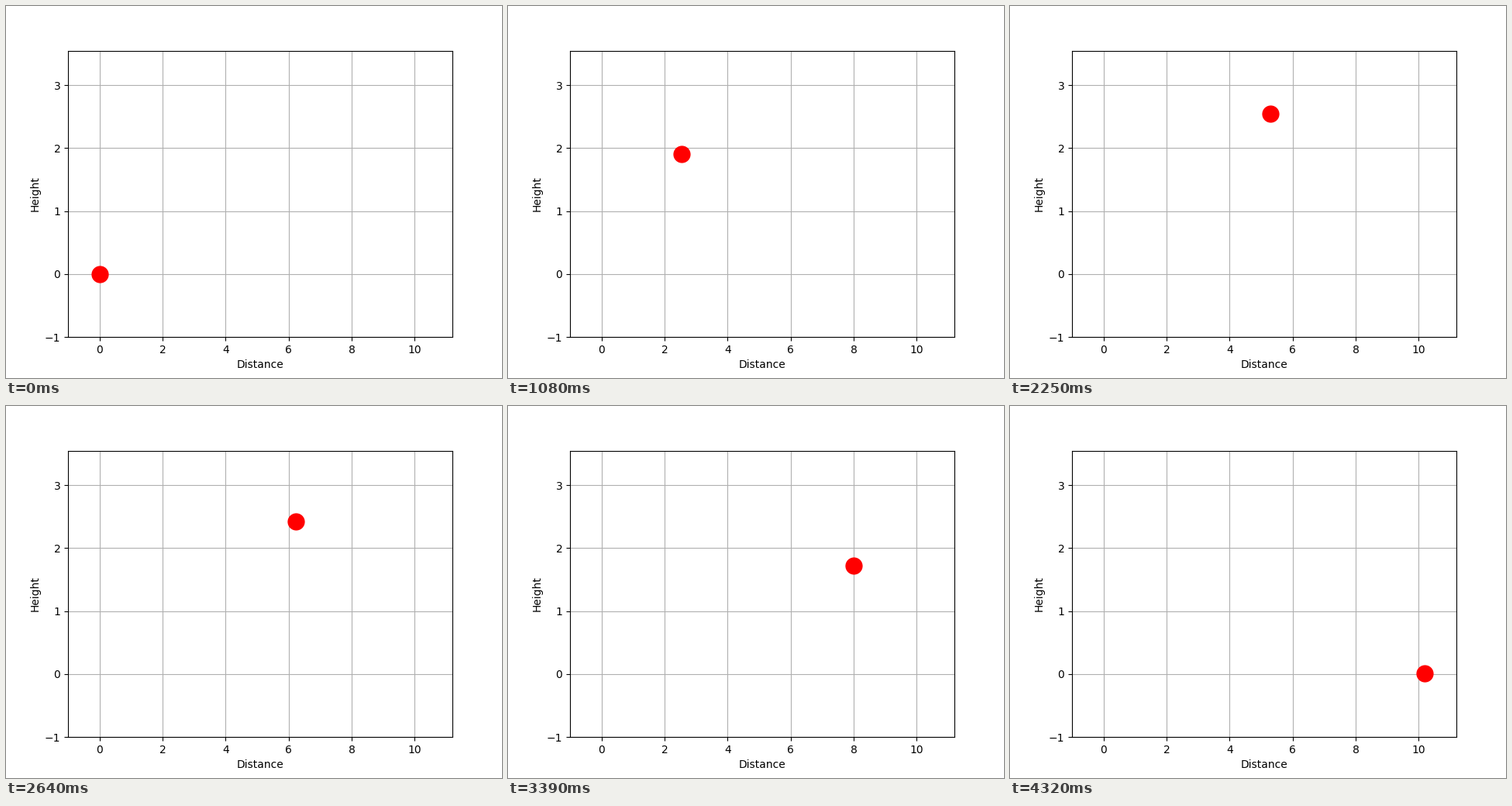
Recreate the animation shown at these times as a matplotlib script. Size 640 by 480 pixels, loop 4.35 s.

```python
import numpy as np
import matplotlib.pyplot as plt
from matplotlib.animation import FuncAnimation

G = 9.81
SPEED = 10.0
ANGLE = np.radians(45)
DT = 0.01

vx, vy = SPEED * np.cos(ANGLE), SPEED * np.sin(ANGLE)
flight = 2 * vy / G
frames = int(flight / DT) + 1

fig, ax = plt.subplots(figsize=(6.4, 4.8), dpi=100)
ax.set_xlim(-1, vx * flight + 1)
ax.set_ylim(-1, vy**2 / (2 * G) + 1)
ax.set_xticks(range(0, 11, 2))
ax.set_yticks(range(-1, 4))
ax.set_xlabel("Distance")
ax.set_ylabel("Height")
ax.grid(True)

ball, = ax.plot([0], [0], "o", color="red", markersize=15)


def update(i):
    t = i * DT
    ball.set_data([vx * t], [vy * t - G * t**2 / 2])
    return ball,


anim = FuncAnimation(fig, update, frames=frames, interval=30,
                     repeat=True, repeat_delay=0)
plt.show()
```
